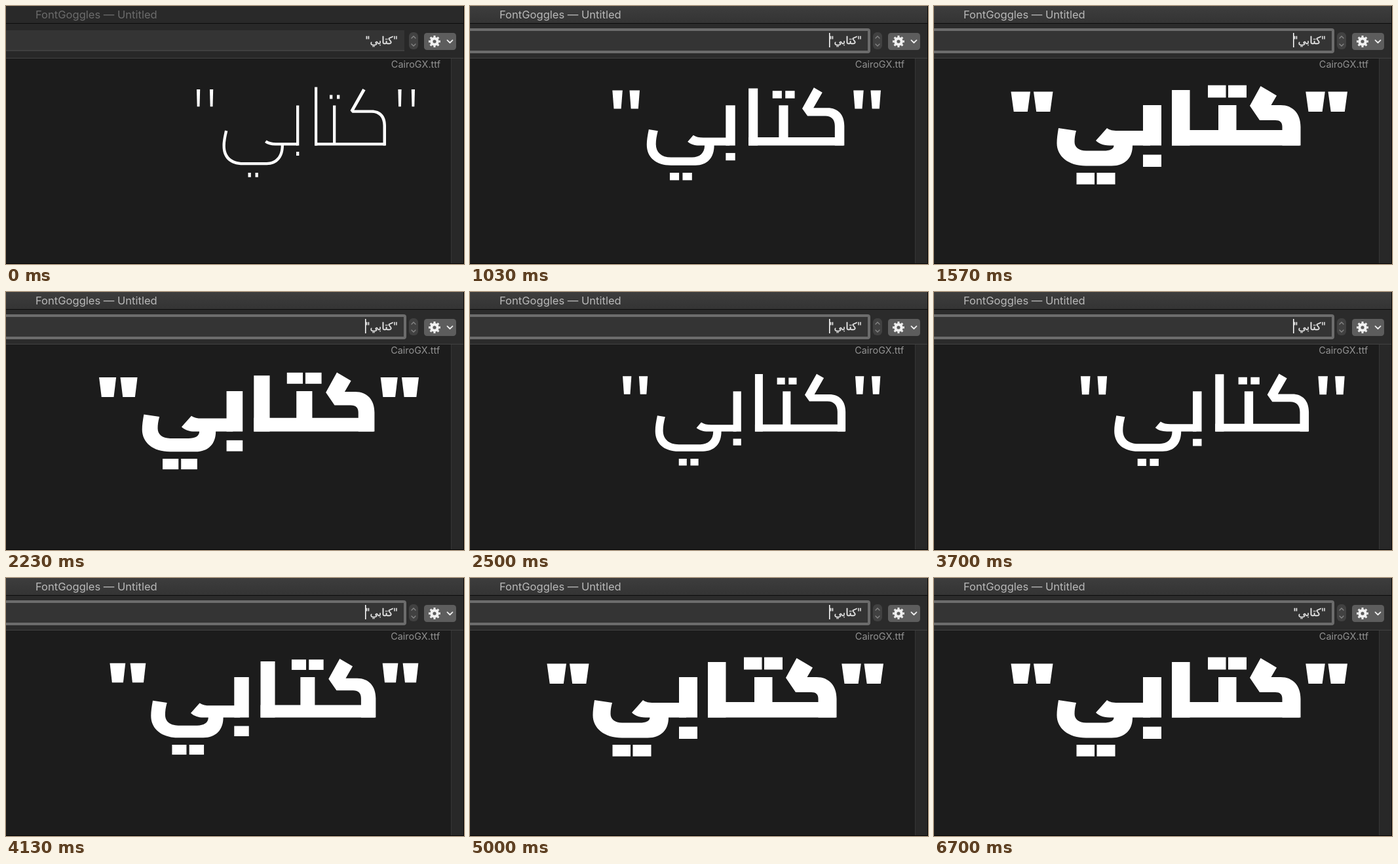
Write an HTML page that moves like this. It is 699x393 px and loops after 7010 ms.

```html
<!DOCTYPE html>
<html lang="en">
<head>
<meta charset="utf-8">
<title>Variable weight</title>
<style>
  html, body { margin: 0; width: 100%; height: 100%; overflow: hidden; background: #1c1c1c; }
  svg { display: block; }
  text { font-family: Inter, Roboto, sans-serif; }
  #title { font-size: 16.56px; fill: #6b6b6b; }
  #titlebar { fill: #292929; }
  #toolbar { fill: #282828; }
  #ring, #caret { visibility: hidden; }
  .active #title { fill: #b8b8b8; }
  .active #titlebar { fill: url(#shade); }
  .active #toolbar { fill: #2b2b2b; }
  .active #ring { visibility: visible; }
  #label { font-size: 14.45px; fill: #929292; text-anchor: end; }
  #input { font: 16px "DejaVu Sans", sans-serif; fill: #e4e4e4; stroke: #e4e4e4; stroke-width: .3; direction: rtl; }
  #word { fill: #fff; }
  .chevron { fill: none; stroke-linecap: round; stroke-linejoin: round; }
</style>
</head>
<body>
<svg id="stage" width="699" height="393" viewBox="0 0 699 393">
  <defs>
    <linearGradient id="shade" x2="0" y2="1">
      <stop stop-color="#3d3d3d"/><stop offset="1" stop-color="#343434"/>
    </linearGradient>
  </defs>
  <rect width="699" height="393" fill="#1c1c1c"/>
  <rect id="titlebar" width="698" height="26"/>
  <rect id="toolbar" y="27" width="698" height="52"/>
  <path d="M0 26.5H699" stroke="#0c0c0c"/>
  <path d="M0 79.5H698" stroke="#424242"/>
  <rect x="679" y="80" width="19" height="312" fill="#282828"/>
  <path d="M679.5 80V392" stroke="#353535"/>
  <path d="M698.5 0V392.5H0" fill="none" stroke="#050505"/>
  <text id="title" x="45" y="19">FontGoggles — Untitled</text>

  <rect x="-2" y="37" width="610" height="31" fill="#343434"/>
  <path d="M0 68H608" stroke="#505050"/>
  <rect id="ring" x="-10" y="36" width="619" height="34" rx="2" fill="#343434" stroke="#6c6c6c" stroke-width="4"/>
  <text id="input" x="598" y="58">"كتابي"</text>
  <rect id="caret" x="548" y="41" width="1.5" height="22" fill="#fff"/>

  <rect x="615" y="40" width="14" height="26" rx="6" fill="#414141"/>
  <path class="chevron" d="M619 49L622 46L625 49M619 58L622 61L625 58" stroke="#858585" stroke-width="1.4"/>
  <rect x="638" y="41" width="49" height="26" rx="4.5" fill="#5d5d5d"/>
  <g transform="translate(654 54)">
    <circle r="4.7" fill="none" stroke="#f2f2f2" stroke-width="4.2"/>
    <circle r="7.6" fill="none" stroke="#f2f2f2" stroke-width="2.8" pathLength="16" stroke-dasharray="1 1" stroke-dashoffset=".5"/>
  </g>
  <path class="chevron" d="M673.5 52.2L677.5 56L681.5 52.2" stroke="#f0f0f0" stroke-width="1.8"/>
  <text id="label" x="663" y="93.5">CairoGX.ttf</text>
  <g id="word"></g>
</svg>
<script>
const LOOP = 7010;
const byId = id => document.getElementById(id);

const box = (l, t, r, b) => `M${l} ${t} H${r} V${b} H${l} Z`;
const tick = (l, r, t, b, inset) =>
  `M${l} ${t} L${r} ${t} L${r - inset} ${b} L${l + inset} ${b} Z`;
const thinTick = l => tick(l, l + 5.2, 127, 153.3, .7);
const blackTick = l => tick(l, l + 29.5, 130.5, 161, 4.2);

// Each part is a [thin, black] pair of outlines with matching commands.
const parts = [
  [thinTick(618.8), blackTick(601.5)],
  [thinTick(598.4), blackTick(567.3)],
  [thinTick(311), blackTick(152)],
  [thinTick(291), blackTick(117.5)],
  // kaf
  ["M544.3 126 L548.6 128.2 L531.3 158.5 L558 158.5 C572 158.5 580 167 580 182 V212.5 H575.5 V182 C575.5 170 569 162.8 558 162.8 H528.5 L525.5 159.3 Z",
   "M498.5 122 L523 136.5 L514.5 151 L529 151 C548 151 559.5 164 559.5 184 V212.5 H531.5 V184 C531.5 177 528 174 521 174 H497 L482 152 Z"],
  // shared baseline, ta tooth and dots, alef
  [box(471, 208.3, 579, 212.6), box(363, 189, 558, 212.5)],
  [box(499, 151.5, 503.3, 211), box(434, 151, 461.5, 211)],
  [box(494, 135.5, 498.3, 141.5), box(418, 120.7, 445.5, 139.5)],
  [box(505, 135.5, 509.3, 141.5), box(449, 120.7, 477, 139.5)],
  [box(471, 123.5, 475.2, 212.6), box(363, 128, 390.5, 212.5)],
  // ba
  [box(443, 151.5, 447.3, 212.6), box(319, 151, 347, 212.5)],
  [box(443, 222, 447.3, 228), box(319, 226.5, 347, 245)],
  // ya
  ["M397.5 204.6 C402 207.2 406 208.3 412 208.3 H445 V212.6 H424 C424 231 414 242.3 398 242.3 H362 C341 242.3 330.5 231 330.5 213 C330.5 206 332 199 334 189.5 L338.3 190.5 C336.3 199 334.8 206 334.8 213 C334.8 228 344 238 362 238 H398 C411 238 419.7 229 419.7 212.6 H411 C404 212.6 399 210.8 395 208 Z",
   "M264 186 C268 189 273 190 280 190 H330 V212.5 H303 C303 231 292 243.5 271 243.5 H232 C205 243.5 187.5 229 187.5 209 C187.5 202 188.5 195 190 186 L217 190 C215 197 214.5 202 214.5 207 C214.5 215 221 220.5 232 220.5 H259 C268 220.5 274.5 218 274.5 212.5 H268 C259 212.5 252 210 247 205 Z"],
  [box(369.5, 254, 373.8, 260.7), box(217.5, 254, 245, 271.7)],
  [box(380.5, 254, 384.8, 260.7), box(248.5, 254, 276.5, 271.7)]
].map(([thin, black]) => {
  const path = document.createElementNS("http://www.w3.org/2000/svg", "path");
  byId("word").append(path);
  const ends = black.match(/[\d.]+/g).map(Number);
  return weight => {
    let i = 0;
    path.setAttribute("d", thin.replace(/[\d.]+/g, n => {
      const end = ends[i++];
      return (+n + (end - n) * weight).toFixed(2);
    }));
  };
});

const snap = (t, start, step) => start + Math.floor((t - start) / step + 1e-6) * step;

// Piecewise linear value through [time, value] points.
function along(points, t) {
  const i = points.findIndex(p => p[0] > t);
  if (i < 0) return points[points.length - 1][1];
  if (i === 0) return points[0][1];
  const [t0, v0] = points[i - 1], [t1, v1] = points[i];
  return v0 + (v1 - v0) * (t - t0) / (t1 - t0);
}

function weightAt(t) {
  if (t < 600) return 0;
  if (t < 1570) return along([[600, .01], [1030, .425], [1570, 1]], snap(t, 600, 35.8));
  if (t < 2170) return 1;
  if (t < 3330) {
    const u = (snap(t, 2170, 33) - 2140) / 840;
    return Math.max(0, 1 - u) ** 1.96;
  }
  if (t < 4370) return along([[3330, .017], [4030, .724], [4130, .764], [4370, 1]], snap(t, 3330, 33.3));
  return 1;
}

const caretSpans = [[600, 4870], [5000, 5570], [6130, 6700]];
let shownWeight;

function draw(now) {
  const t = now % LOOP;
  const weight = weightAt(t);
  if (weight !== shownWeight) parts.forEach(setWeight => setWeight(weight));
  shownWeight = weight;
  byId("stage").classList.toggle("active", t >= 600);
  const caretOn = caretSpans.some(([from, to]) => t >= from && t < to);
  byId("caret").style.visibility = caretOn ? "visible" : "hidden";
  byId("label").setAttribute("x", t >= 2170 && t < 4370 ? 662.3 : 663);
}

const start = performance.now();
function tickFrame() {
  draw(performance.now() - start);
  requestAnimationFrame(tickFrame);
}
tickFrame();
</script>
</body>
</html>
```
